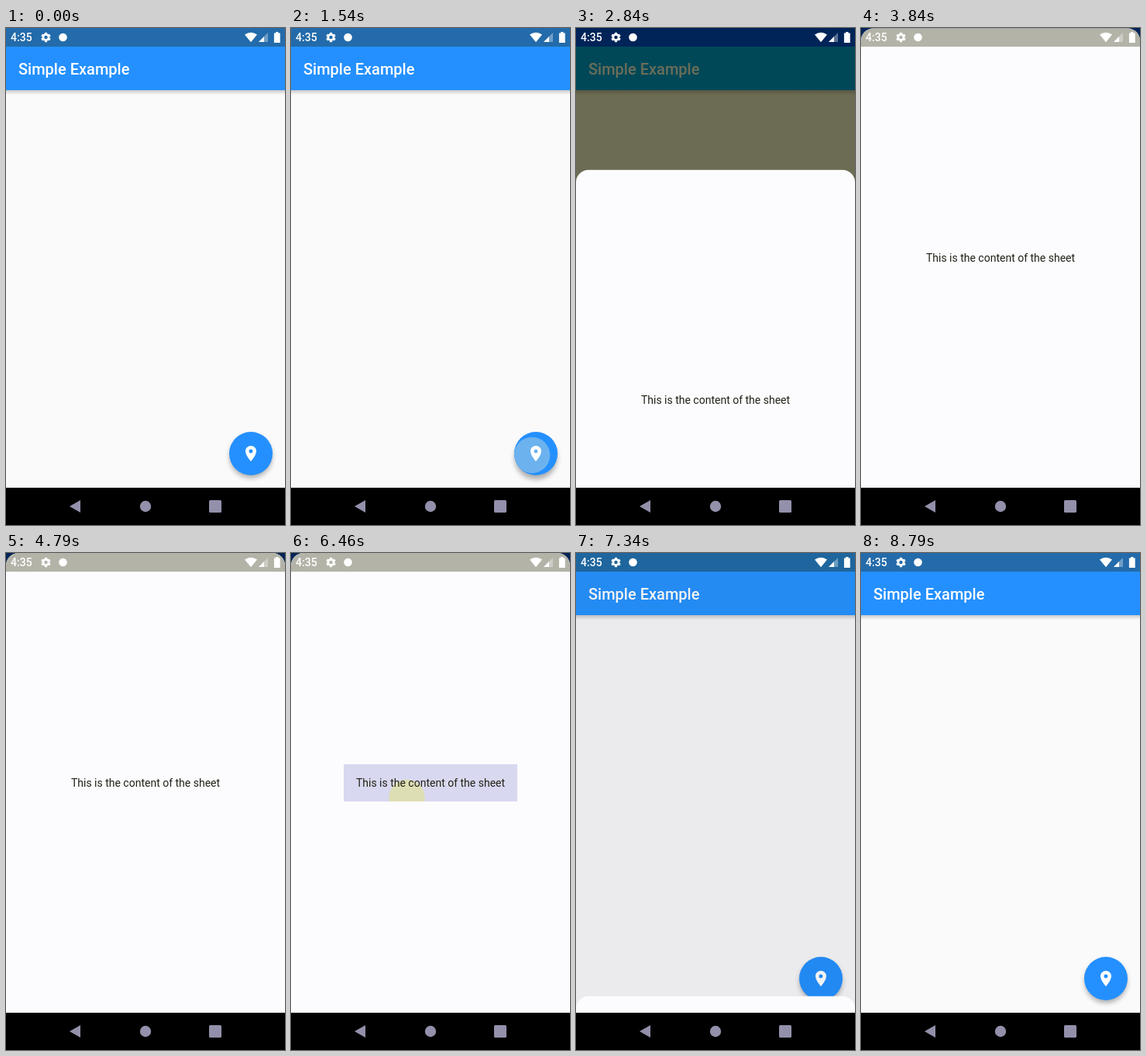
An HTML page that plays this animation: 360 px wide and 640 px high, repeating every 9000 ms.

```html
<!DOCTYPE html>
<html lang="en">
<head>
<meta charset="utf-8">
<title>Sliding sheet</title>
<style>
  html, body { margin: 0; width: 100%; height: 100%; overflow: hidden; background: #000; }
  svg { display: block; width: 360px; height: 640px; font-family: Roboto, sans-serif; }
  .medium { font-weight: 500; }
</style>
</head>
<body>
<svg viewBox="0 0 360 640">
  <defs>
    <clipPath id="statusClip"><rect width="360" height="24"/></clipPath>
    <clipPath id="fabClip"><circle cx="316" cy="548" r="28"/></clipPath>
    <clipPath id="buttonClip"><rect x="68" y="272" width="224" height="48"/></clipPath>
    <filter id="blur" x="-50%" y="-50%" width="200%" height="200%"><feGaussianBlur stdDeviation="3"/></filter>
    <linearGradient id="barShade" x2="0" y2="1">
      <stop stop-color="#000" stop-opacity=".2"/>
      <stop offset="1" stop-color="#000" stop-opacity="0"/>
    </linearGradient>
  </defs>

  <rect id="page" width="360" height="592"/>
  <rect y="80" width="360" height="6" fill="url(#barShade)"/>
  <rect id="appBar" width="360" height="80"/>
  <text id="title" class="medium" x="16" y="60" font-size="20">Simple Example</text>
  <rect id="status" width="360" height="24"/>

  <g id="fab">
    <circle id="fabShadow" cx="316" cy="552" r="27.5" filter="url(#blur)" opacity=".3"/>
    <circle cx="316" cy="548" r="28" fill="#2490ff"/>
    <g clip-path="url(#fabClip)"><circle id="fabRipple" cx="311" cy="550" fill="#6cb2ee"/></g>
    <path transform="translate(304 536)" fill="#fff" fill-rule="evenodd" d="M12 2C8.13 2 5 5.13 5 9c0 5.25 7 13 7 13s7-7.75 7-13c0-3.87-3.13-7-7-7zm0 9.5a2.5 2.5 0 1 1 0-5a2.5 2.5 0 0 1 0 5z"/>
    <circle id="fabDim" cx="316" cy="548" r="28"/>
  </g>

  <g id="sheet">
    <rect width="360" height="700" rx="16" fill="#fcfcfe"/>
    <g clip-path="url(#buttonClip)">
      <rect id="highlight" x="68" y="272" width="224" height="48" fill="#d8d8f0"/>
      <circle id="buttonRipple" cx="149.5" cy="315" fill="#dedeb4"/>
    </g>
    <text x="180" y="301" font-size="14" text-anchor="middle" fill="#222218">This is the content of the sheet</text>
  </g>
  <g clip-path="url(#statusClip)">
    <rect id="sheetTint" width="360" height="700" rx="16" fill="#b3b3a8"/>
  </g>

  <g fill="#fff">
    <text class="medium" x="6" y="17" font-size="14">4:35</text>
    <g fill="none" stroke="#fff">
      <circle cx="51.5" cy="12" r="3.6" stroke-width="2.8"/>
      <circle cx="51.5" cy="12" r="5.4" stroke-width="1.8" pathLength="12" stroke-dasharray="1.1 .9" stroke-dashoffset="1.55"/>
    </g>
    <circle cx="73.5" cy="12" r="5.3"/>
    <path d="M308 8.6Q316 3 324 8.6L316 18.2Z"/>
    <path d="M326 18L338 6V18Z" opacity=".35"/>
    <path d="M326 18L333 11V18Z"/>
    <path d="M348.2 5h3.2v1.4h2.3V19h-7.8V6.4h2.3z"/>
  </g>

  <rect y="592" width="360" height="48"/>
  <g fill="#9290aa">
    <path d="M82 616L96 608V624Z"/>
    <circle cx="180" cy="616" r="7.2"/>
    <rect x="262" y="608" width="16" height="16" rx="1.5"/>
  </g>
</svg>

<script>
const LOOP = 9000;
const HIDDEN = 592, REST = 354;
const $ = id => document.getElementById(id);
const clamp = x => Math.min(1, Math.max(0, x));
const lerp = (a, b, k) => a + (b - a) * k;
const expoOut = x => x >= 1 ? 1 : 1 - 2 ** (-10 * x);

// cubic-bezier(.25, .1, .25, 1)
function ease(x) {
  const bez = (a, b, u) => 3 * a * u * (1 - u) ** 2 + 3 * b * u * u * (1 - u) + u ** 3;
  let lo = 0, hi = 1;
  for (let i = 0; i < 24; i++) {
    const mid = (lo + hi) / 2;
    if (bez(.25, .25, mid) < x) lo = mid; else hi = mid;
  }
  return bez(.1, 1, hi);
}

// start, duration, from, to, easing
const moves = [
  [1600, 400, HIDDEN, REST, expoOut],
  [2480, 400, REST, 182.5, expoOut],
  [3490, 400, 182.5, 0, expoOut],
  [6580, 1000, 0, HIDDEN, ease]
];

// no dim, partial dim, full dim
const PARTIAL = .61;
const tones = {
  page: [[250, 250, 250], [148, 145, 171], [108, 108, 84]],
  appBar: [[36, 144, 255], [35, 107, 171], [0, 72, 88]],
  status: [[35, 107, 170], [0, 72, 84], [0, 36, 88]],
  title: [[255, 255, 255], [178, 180, 170], [108, 110, 88]]
};

function sheetTop(t) {
  let top = HIDDEN;
  for (const [start, span, from, to, curve] of moves)
    if (t >= start) top = lerp(from, to, curve(clamp((t - start) / span)));
  return top;
}

function tone([clear, part, full], dim) {
  const low = dim < PARTIAL;
  const k = low ? dim / PARTIAL : (dim - PARTIAL) / (1 - PARTIAL);
  const [a, b] = low ? [clear, part] : [part, full];
  return `rgb(${a.map((v, i) => Math.round(lerp(v, b[i], k)))})`;
}

function ripple(id, age, reach) {
  const el = $(id);
  el.setAttribute('r', age < 0 ? 0 : Math.min(reach, 8 + age * .2));
  el.setAttribute('opacity', age < 0 ? 0 : clamp((330 - age) / 200));
}

function draw(t) {
  const top = sheetTop(t);
  const dim = clamp((HIDDEN - top) / (HIDDEN - REST));
  for (const id in tones) $(id).setAttribute('fill', tone(tones[id], dim));
  for (const id of ['sheet', 'sheetTint']) $(id).setAttribute('transform', `translate(0 ${top})`);
  $('fabDim').setAttribute('opacity', dim * .54);

  ripple('fabRipple', t - 1465, 62);
  ripple('buttonRipple', t - 6385, 150);

  const press = clamp((t - 1465) / 60) * clamp((1800 - t) / 150);
  $('fabShadow').setAttribute('cy', 552 + press * 2);
  $('highlight').setAttribute('opacity', clamp((t - 6370) / 70) * clamp((6760 - t) / 180));
}

const begin = performance.now();
function tick() {
  draw((performance.now() - begin) % LOOP);
  requestAnimationFrame(tick);
}
tick();
</script>
</body>
</html>
```
